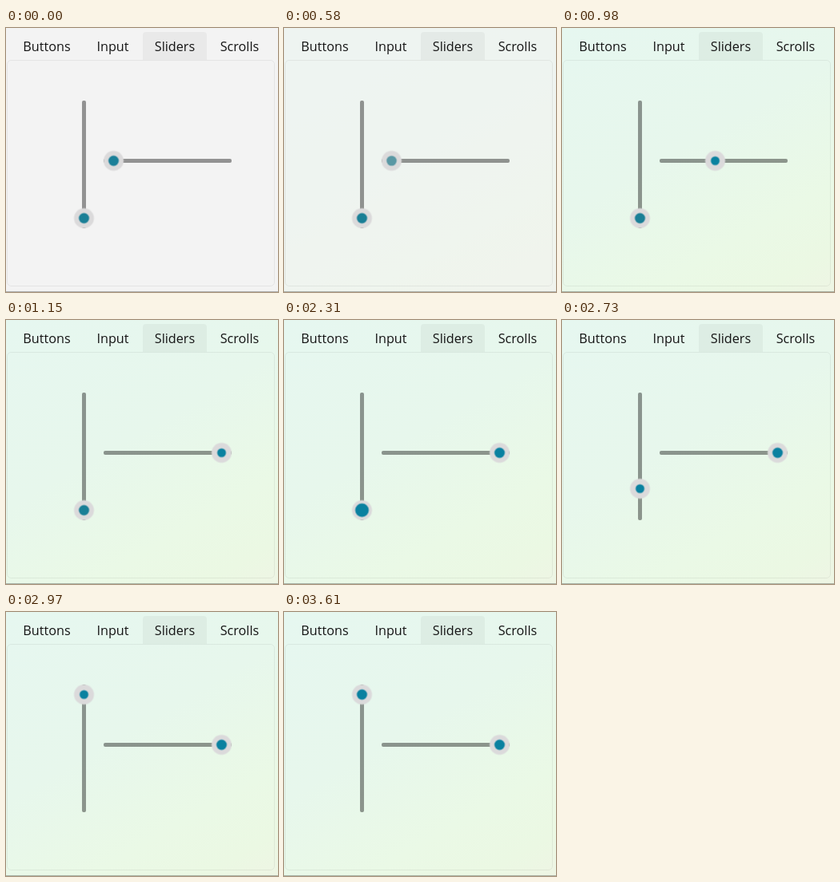
These frames come from a looping animation (340 by 331 pixels, 3.71 s). An HTML page:

```html
<!DOCTYPE html>
<html lang="en">
<head>
<meta charset="utf-8">
<title>Sliders</title>
<style>
html, body { margin: 0; width: 100%; height: 100%; overflow: hidden; background: #f3f3f3; }
.tint {
  position: absolute; inset: 0;
  background: linear-gradient(150deg, #e6f7f0, #e7f7ec 45%, #eaf9e6 74%, #ebf8e3 90%, #eef5e4);
}
svg { position: absolute; left: 0; top: 0; width: 340px; height: 331px; }
text { font: 16.2px "Open Sans", "Noto Sans", sans-serif; fill: #141414; text-anchor: middle; }
.track { fill: rgba(0, 0, 0, .4); }
.ring { fill: #dbdadb; }

/* One loop is 3710 ms; motion advances in 30 ms steps. */
.tint, .thumb, .dot { animation: 3710ms step-end infinite; }
.tint { animation-name: activate; }
.thumb.h { animation-name: slide-h; }
.thumb.v { animation-name: slide-v; }
.h .dot { animation-name: dot-h; }
.v .dot { animation-name: dot-v; }

@keyframes activate {
  0% { opacity: 0; }
  14.55% { opacity: .2; animation-timing-function: steps(5, end); }
  18.59%, 100% { opacity: 1; }
}
@keyframes slide-h {
  0% { transform: translate(134.5px, 166.5px); }
  20.75% { transform: translate(135.5px, 166.5px); }
  21.56% { transform: translate(138.5px, 166.5px); }
  22.37% { transform: translate(143.5px, 166.5px); }
  23.18% { transform: translate(149.5px, 166.5px); animation-timing-function: steps(4, end); }
  26.41% { transform: translate(191.5px, 166.5px); animation-timing-function: steps(2, end); }
  28.03% { transform: translate(217.5px, 166.5px); }
  28.84% { transform: translate(231px, 166.5px); }
  29.64% { transform: translate(248px, 166.5px); }
  30.99%, 100% { transform: translate(269.5px, 166.5px); }
}
@keyframes slide-v {
  0% { transform: translate(97.5px, 238.5px); }
  72.77% { transform: translate(97.5px, 228px); animation-timing-function: steps(4, end); }
  76.01% { transform: translate(97.5px, 162px); }
  76.81% { transform: translate(97.5px, 147.5px); animation-timing-function: steps(2, end); }
  78.43% { transform: translate(97.5px, 119px); }
  79.24% { transform: translate(97.5px, 108px); }
  80.05%, 100% { transform: translate(97.5px, 103.5px); }
}
@keyframes dot-h {
  0% { r: 6.5px; fill: #1a7f98; }
  2.69% { r: 8.5px; fill: #1a7f98; }
  14.55% { r: 7.5px; fill: #3b8b9e; }
  15.36% { r: 6.3px; fill: #5a98a4; }
  16.17% { r: 5.5px; fill: #5a98a4; }
  23.98% { r: 5.5px; fill: #0a82a0; }
  41.50%, 100% { r: 6.5px; fill: #0a81a0; }
}
@keyframes dot-v {
  0% { r: 6.5px; fill: #1a7f96; }
  62.26% { r: 8.5px; fill: #0a81a0; }
  69.27% { r: 7.5px; fill: #0a81a0; }
  70.08% { r: 6.3px; fill: #0a81a0; }
  70.88% { r: 5.5px; fill: #0a81a0; }
  97.30%, 100% { r: 6.5px; fill: #0a81a0; }
}
</style>
</head>
<body>
<div class="tint"></div>
<svg viewBox="0 0 340 331">
  <path d="M171 40V9a4 4 0 0 1 4-4h72a4 4 0 0 1 4 4v31z" fill="#000" fill-opacity=".038"/>
  <rect x="1.5" y="40.5" width="334" height="283" rx="5" fill="none" stroke="#000" stroke-opacity=".06"/>
  <rect y="330" width="340" height="1" fill="#000" fill-opacity=".28"/>

  <text x="51" y="29">Buttons</text>
  <text x="133.5" y="29">Input</text>
  <text x="211" y="29">Sliders</text>
  <text x="292" y="29">Scrolls</text>

  <rect class="track" x="95" y="91" width="5" height="160" rx="2"/>
  <rect class="track" x="122" y="164" width="160" height="5" rx="2"/>

  <g class="thumb v"><circle class="ring" r="12.5"/><circle class="dot" r="6.5"/></g>
  <g class="thumb h"><circle class="ring" r="12.5"/><circle class="dot" r="6.5"/></g>
</svg>
</body>
</html>
```
